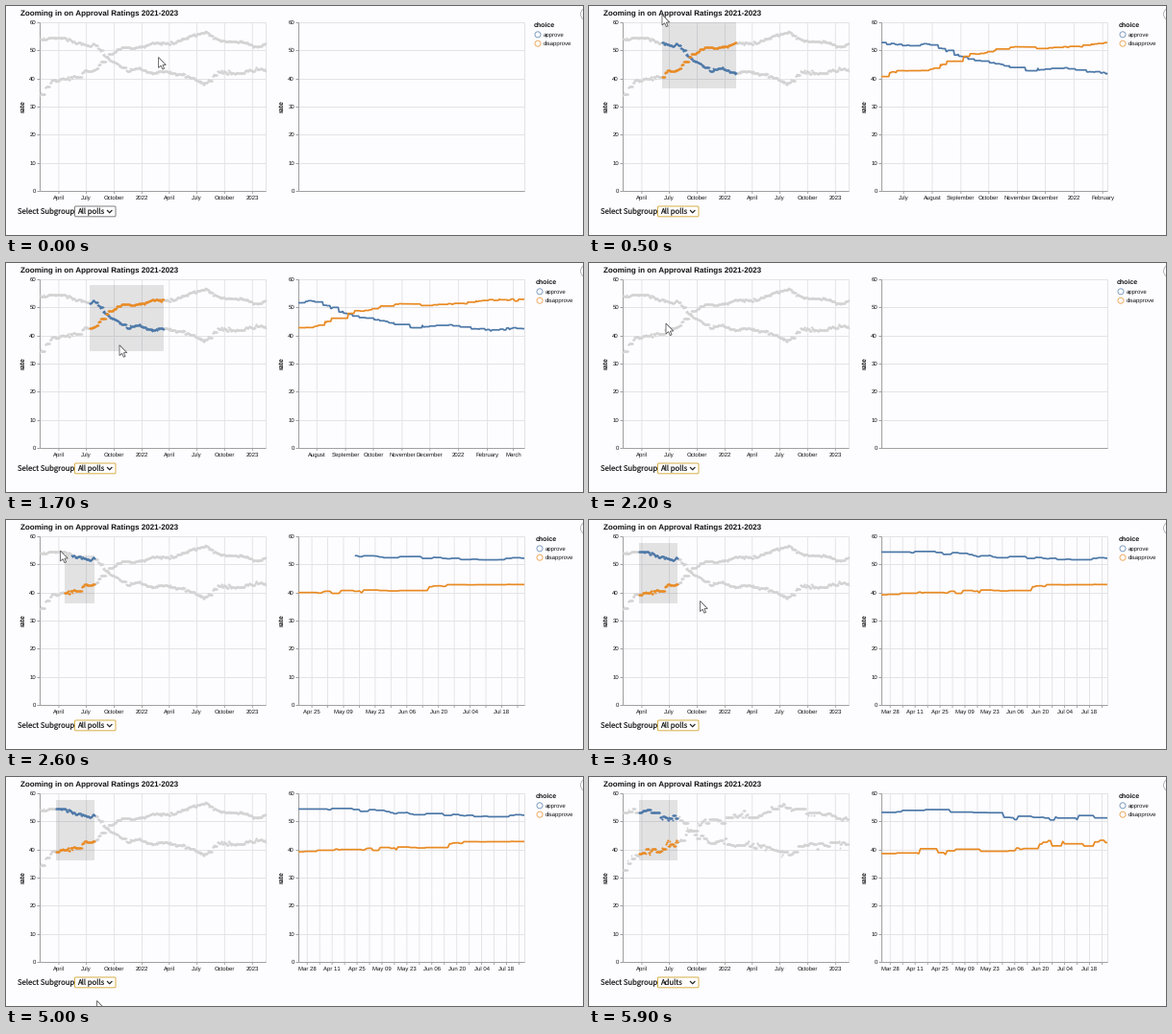
A matplotlib script that plays this animation: 600 by 239 pixels, repeating every 6 s.

```python
import numpy as np
import matplotlib.pyplot as plt
import matplotlib.dates as mdates
from matplotlib.animation import FuncAnimation
from matplotlib.patches import Rectangle, FancyBboxPatch, Circle, Polygon

W, H, DPI = 600, 239, 100
PT = 72 / DPI
BG, GRID, AXIS, GREY = "#fdfcfe", "#e3e3e6", "#a0a0a0", "#d3d3d3"
COLORS = {"approve": "#4c78a8", "disapprove": "#e98a22"}
TOP, BOTTOM = 17, 193
LEFT, RIGHT = (35, 270), (304, 539)
days = np.arange(27, 774)
EPOCH = mdates.date2num(np.datetime64("2021-01-01"))
rng = np.random.default_rng(4)

plt.rcParams.update({"font.family": "Liberation Sans", "text.hinting": "none",
                     "text.hinting_factor": 1})
fig = plt.figure(figsize=(W / DPI, H / DPI), dpi=DPI, facecolor=BG)
ax = fig.add_axes([0, 0, 1, 1])


def day_x(day):
    return 141.4 + (day - 365) * 0.3144


def rate_y(rate):
    return BOTTOM - rate * (BOTTOM - TOP) / 60


# Turning points of the trends: overview x, rate
TRENDS = {
    "approve": [(35, 54.2), (52, 54.4), (66, 53.8), (69, 53.1), (87, 51.6), (92, 52.2),
                (104, 47.5), (126, 42.9), (137, 43.8), (152, 41.8), (161, 42.8),
                (184, 41.5), (206, 38.2), (220, 42.4), (245, 42), (258, 43.7), (270, 43)],
    "disapprove": [(35, 34.2), (46, 39), (76, 40.8), (80, 42.3), (92, 43.1), (102, 47.6),
                   (120, 51.1), (136, 50.9), (150, 52.6), (175, 52.9), (198, 56),
                   (206, 56.6), (222, 53.5), (245, 53.2), (260, 51.2), (270, 52)],
}


def poll_average(trend, shift, spread, jump_chance):
    """A noisy trend that holds its value between random jumps."""
    n = len(days)
    noisy = np.interp(day_x(days), *zip(*trend)) + shift + rng.normal(0, spread, n)
    jumps = rng.random(n) < jump_chance
    last_jump = np.maximum.accumulate(np.where(jumps, np.arange(n), 0))
    return noisy[last_jump]


def poll_group(shift, spread, jump_chance):
    return {name: poll_average(trend, shift, spread, jump_chance)
            for name, trend in TRENDS.items()}


DATA = {"All polls": poll_group(0, 0.25, 0.25), "Adults": poll_group(-0.6, 0.6, 0.13)}

# Cursor path: frame, x, y
CURSOR = [(0, 158.5, 53.5), (1, 152.8, 86), (5, 76, 9), (7, 107, 80), (11, 157, 89),
          (14, 196, 88), (19, 66, 84), (22, 80, 63), (23, 88.2, 82), (26, 56.5, 32),
          (28, 48, 19), (34, 115.5, 84.5), (42, 97, 210), (50, 94.5, 233.5),
          (54, 94.5, 233.5), (56, 97, 260)]


def cursor_at(frame):
    t, x, y = zip(*CURSOR)
    return np.interp(frame, t, x), np.interp(frame, t, y)


def brush_at(frame):
    """Selected rectangle as x0, y0, x1, y1: drawn, dragged, cleared, drawn again."""
    if 2 <= frame <= 6:
        x, y = cursor_at(min(frame, 5))
        return x, max(y, TOP), 152.8, 86
    if 7 <= frame <= 21:
        x, y = cursor_at(frame)
        x, y = max(x - 31, LEFT[0]), max(y - 63, TOP)
        return x, y, x + 76.8, y + 69
    if frame >= 24:
        x, y = cursor_at(min(frame, 28))
        return x + 4, y + 5, 92.2, 87
    return None


def text(x, y, s, size=6, **kw):
    ax.text(x, y, s, fontsize=size * PT, **{"color": "#111", **kw})


def line(x, y, color, width=1.0, **kw):
    ax.plot(x, y, color=color, lw=width * PT, solid_capstyle="butt", **kw)


def time_ticks(first, last):
    """Day numbers and labels, stepped to suit the span."""
    span = last - first
    ticks = []
    for day in range(int(np.ceil(first)), int(last) + 1):
        date = mdates.num2date(EPOCH + day)
        sunday = date.weekday() == 6
        if span < 37:
            keep = date.day % 2 == 1
        elif span < 146:
            keep = sunday
        else:
            keep = date.day == 1 and (span < 527 or date.month % 3 == 1)
        if keep:
            if date.day == 1:
                form = "%Y" if date.month == 1 else "%B"
            else:
                form = "%b %d" if sunday else "%a %d"
            ticks.append((day, date.strftime(form)))
    return ticks


def draw_axes(x0, x1, extent):
    for rate in range(0, 61, 10):
        y = rate_y(rate)
        line([x0, x1], [y, y], GRID)
        line([x0 - 3, x0], [y, y], AXIS)
        text(x0 - 4, y + 2.1, str(rate), ha="right")
    line([x1, x1], [TOP, BOTTOM], GRID)
    if extent:
        first, last = extent
        scale = (x1 - x0) / max(last - first, 1)
        ticks = time_ticks(first, last)
        gap = (ticks[1][0] - ticks[0][0]) * scale if len(ticks) > 1 else W
        stride = 1
        while gap * stride < 24:
            stride *= 2
        for i, (day, label) in enumerate(ticks):
            x = x0 + (day - first) * scale
            line([x, x], [TOP, BOTTOM], GRID, 0.9, snap=False)
            line([x, x], [BOTTOM, BOTTOM + 3], AXIS, 0.9, snap=False)
            if i % stride == 0:
                text(x, 202, label, ha="center")
    line([x0, x0], [TOP, BOTTOM], AXIS)
    line([x0, x1], [BOTTOM, BOTTOM], AXIS)
    text(x0 - 17, 105, "rate", 6.6, weight="bold", rotation=90, ha="center", va="center")


def draw_legend(shift):
    x = 549 + shift
    text(x, 22, "choice", 6.6, weight="bold")
    for y, (name, color) in zip((29.8, 39.2), COLORS.items()):
        ax.add_patch(Circle((x + 4, y), 3, fc="none", ec=color, lw=0.9 * PT, alpha=0.75))
        text(x + 10, y + 1.8, name)


def draw_select(label, focused):
    style = dict(size=7.7, family="Noto Sans CJK JP", color="#222")
    text(12, 217, "Select Subgroup", **style)
    ax.add_patch(FancyBboxPatch((71.5, 209), 42.5, 10.8, boxstyle="round,pad=0,rounding_size=1.2",
                                fc="white", ec="#d8b04a" if focused else "#808080", lw=PT))
    text(74, 217, label, **style)
    line([105, 107.7, 110.4], [213, 215.8, 213], "#222", 1.2)


def draw_cursor(x, y):
    shape = np.array([(0, 0), (0, 11), (2.6, 8.7), (4.4, 12.6), (6.1, 11.8), (4.4, 8.1), (7.8, 8)])
    ax.add_patch(Polygon(shape + (x, y), fc="white", ec="#555", lw=0.8 * PT, zorder=9))


def draw(frame):
    ax.clear()
    ax.set(xlim=(0, W), ylim=(H, 0))
    ax.axis("off")

    group = "Adults" if frame >= 55 else "All polls"
    brush = brush_at(frame)
    x = day_x(days)
    chosen = {}
    if brush:
        x0, y0, x1, y1 = brush
        for name, rates in DATA[group].items():
            y = rate_y(rates)
            inside = (x >= x0) & (x <= x1) & (y >= y0) & (y <= y1)
            if inside.any():
                chosen[name] = inside
    extent = None
    if chosen:
        picked = days[np.any(list(chosen.values()), axis=0)]
        extent = picked[0], picked[-1]

    text(15, 10, "Zooming in on Approval Ratings 2021-2023", 7.64, weight="bold")
    draw_axes(*LEFT, (days[0] - 0.4, days[-1] + 0.6))
    draw_axes(*RIGHT, extent)

    if brush:
        ax.add_patch(Rectangle((x0, y0), x1 - x0, y1 - y0, fc="#333", alpha=0.13, lw=0, zorder=2.5))
    dots = dict(ls="", marker="o", mew=0, ms=1.8 * PT, zorder=3)
    for name, rates in DATA[group].items():
        y = rate_y(rates)
        inside = chosen.get(name, np.zeros(len(days), bool))
        line(x[~inside], y[~inside], GREY, **dots)
        line(x[inside], y[inside], COLORS[name], **dots)
        if inside.any():
            scale = (RIGHT[1] - RIGHT[0]) / max(extent[1] - extent[0], 1)
            line(RIGHT[0] + (days[inside] - extent[0]) * scale, y[inside], COLORS[name], 1.7, zorder=3)

    draw_legend(2 if chosen else 0)
    draw_select(group, frame >= 1)
    ax.add_patch(Circle((604, 8.5), 6.5, fc="none", ec="#aaa", lw=0.8 * PT))
    draw_cursor(*cursor_at(frame))
    return []


anim = FuncAnimation(fig, draw, frames=60, interval=100, init_func=lambda: [],
                     repeat=True, repeat_delay=0)
plt.show()
```
